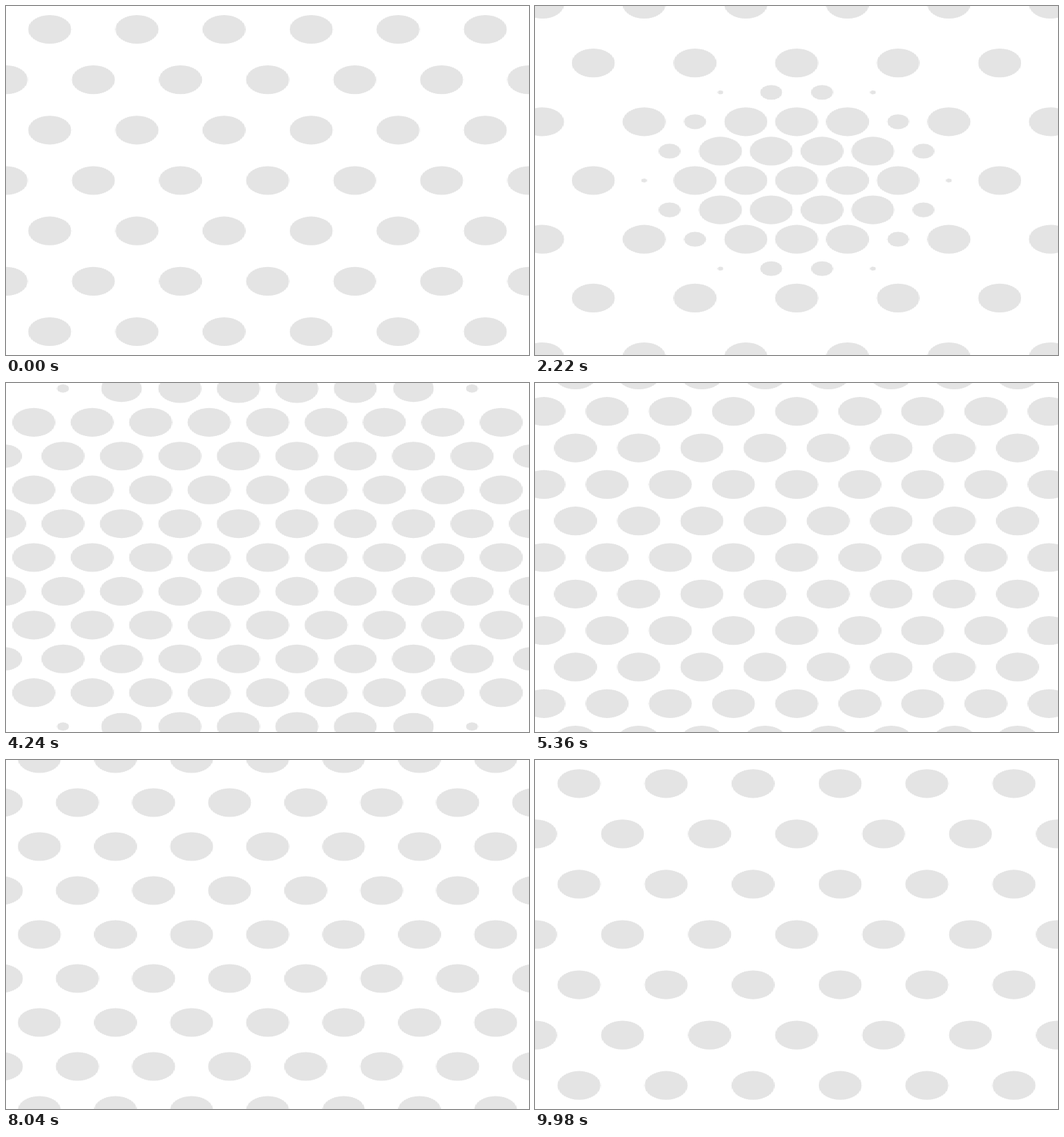
Recreate the animation shown at these times as an HTML page with a canvas. Size 750 by 500 pixels, loop 10 s.

```html
<!DOCTYPE html>
<html lang="en">
<head>
<meta charset="utf-8">
<title>Endless dot zoom</title>
<style>
  html, body { margin: 0; width: 100%; height: 100%; overflow: hidden; background: #fff; }
  canvas { display: block; width: 750px; height: 500px; image-rendering: pixelated; }
</style>
</head>
<body>
<canvas id="stage" width="500" height="500"></canvas>
<script>
const LOOP = 10000, SIZE = 500, RADIUS = 20.6;
const ctx = document.getElementById('stage').getContext('2d');

const clamp = v => Math.min(1, Math.max(0, v));
const ease = p => p < 0.5 ? 4 * p ** 3 : 1 - 4 * (1 - p) ** 3;

// New dots open in a wave that travels outwards at constant speed.
const growth = (t, dist) => ease(clamp(9.32 * t - 0.177 - 0.0108 * dist));

function draw(t) {
  const step = SIZE / 12 * 2 ** t;
  ctx.fillStyle = '#fff';
  ctx.fillRect(0, 0, SIZE, SIZE);
  ctx.fillStyle = '#e4e4e4';
  for (let j = -8; j <= 8; j++) {
    for (let i = -12; i <= 12; i++) {
      const x = (i + j / 2) * step;
      const y = j * Math.sqrt(3) / 2 * step;
      const settled = i % 2 === 0 && j % 2 === 0;
      const r = RADIUS * (settled ? 1 : growth(t, Math.hypot(x, y)));
      if (r <= 0) continue;
      ctx.beginPath();
      ctx.arc(SIZE / 2 + x, SIZE / 2 + y, r, 0, Math.PI * 2);
      ctx.fill();
    }
  }
}

function tick() {
  draw(performance.now() % LOOP / LOOP);
  requestAnimationFrame(tick);
}
tick();
</script>
</body>
</html>
```
